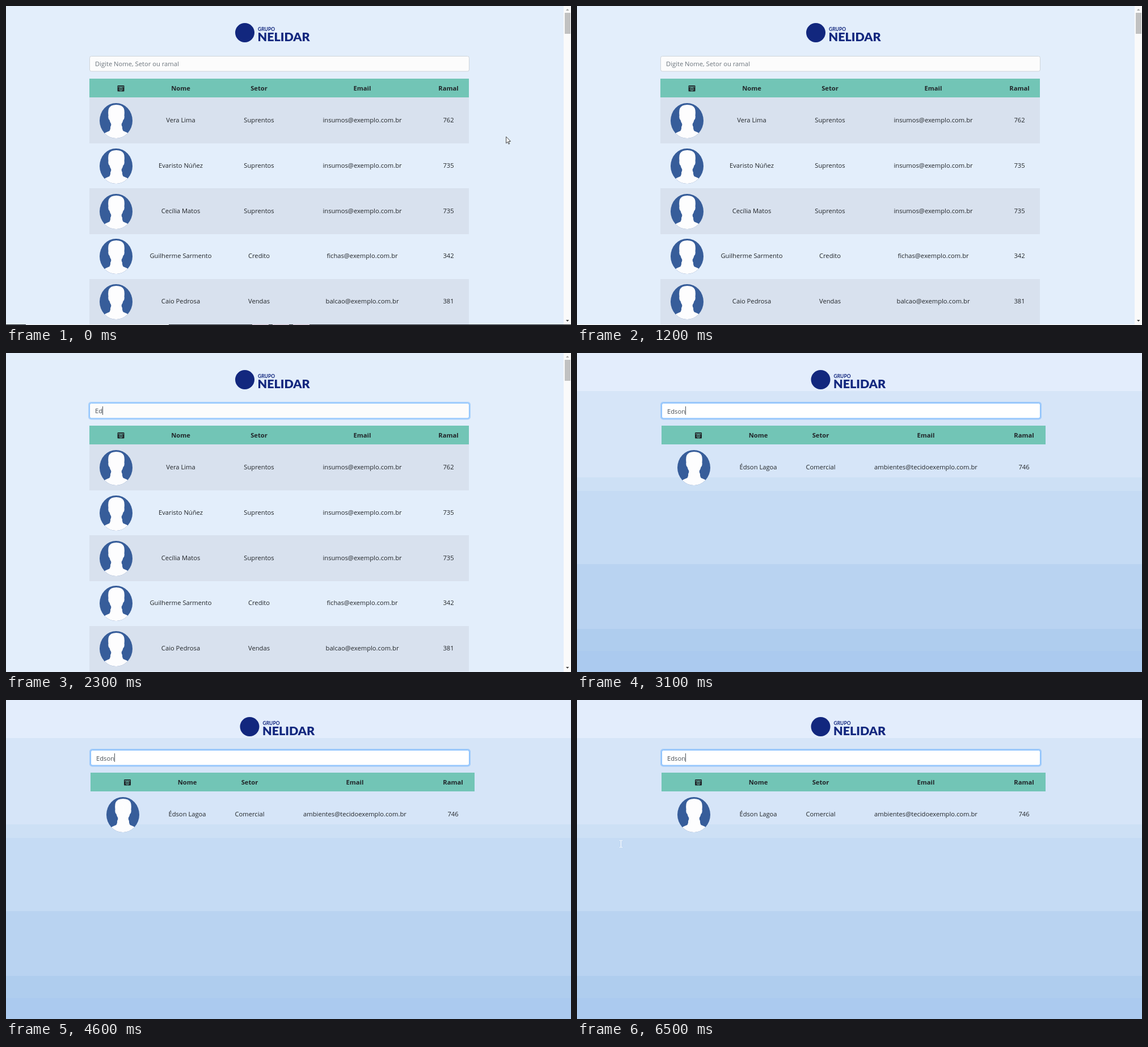
An HTML page with a canvas for the animation above (7000 ms loop, 996 px wide and 562 px high).

```html
<!DOCTYPE html>
<html lang="pt-BR">
<head>
<meta charset="utf-8">
<title>Ramais</title>
<style>
html, body { margin: 0; width: 100%; height: 100%; overflow: hidden; }
canvas { display: block; }
</style>
</head>
<body>
<canvas id="stage" width="996" height="562"></canvas>
<script>
const ctx = document.getElementById('stage').getContext('2d');
const LOOP = 7000;
const FACE = '"Open Sans", "Noto Sans", sans-serif';
const BODY = '11.2px ' + FACE;
const BOLD = 'bold 11.2px ' + FACE;
const INK = '#212529', NAVY = '#12277e', PAGE = '#e3eefb', GREEN = '#72c5b6';

const people = [
  ['Vera Lima', 'Suprentos', 'insumos@exemplo.com.br', '762'],
  ['Evaristo Núñez', 'Suprentos', 'insumos@exemplo.com.br', '735'],
  ['Cecília Matos', 'Suprentos', 'insumos@exemplo.com.br', '735'],
  ['Guilherme Sarmento', 'Credito', 'fichas@exemplo.com.br', '342'],
  ['Caio Pedrosa', 'Vendas', 'balcao@exemplo.com.br', '381']
];
const match = ['Édson Lagoa', 'Comercial', 'ambientes@tecidoexemplo.com.br', '746'];
const rowTops = [161, 242, 321, 402, 481, 561];
const bands = [[0, '#e3edfc'], [67, '#d6e5f8'], [219, '#cde0f5'], [243, '#c5dbf4'],
               [372, '#b9d3f1'], [486, '#afcdee'], [525, '#abcaef']];

const full = { logo: 421, left: 147, fieldRight: 817, right: 816, icon: 202.5, photo: 194,
               cols: [308, 446, 628, 780] };
const found = { logo: 429.5, left: 149, fieldRight: 817, right: 826, icon: 214, photo: 206,
                cols: [319.5, 429.5, 615, 788] };

// Pointer paths as [time, x, y]
const arrowPath = [[0, 882, 230], [200, 882, 230], [400, 620, 180], [500, 370, 130], [600, 180, 102]];
const beamPath = [[4300, 412, 128], [4400, 320, 166], [4500, 237, 193], [4600, 207, 192],
                  [5300, 207, 192], [5600, 207, 208], [5700, 207, 208], [5800, 213, 228],
                  [6200, 212, 219], [6300, 212, 219], [6500, 77, 253], [7000, 77, 253]];

function rect(x, y, w, h, color) {
  ctx.fillStyle = color;
  ctx.fillRect(x, y, w, h);
}

function text(str, x, y, font, color, align) {
  ctx.font = font;
  ctx.fillStyle = color;
  ctx.textAlign = align || 'left';
  ctx.fillText(str, x, y);
}

function shape(points, color) {
  ctx.beginPath();
  points.forEach(([x, y]) => ctx.lineTo(x, y));
  ctx.closePath();
  ctx.fillStyle = color;
  ctx.fill();
}

function disc(x, y, r, color) {
  ctx.beginPath();
  ctx.arc(x, y, r, 0, 7);
  ctx.fillStyle = color;
  ctx.fill();
}

function rounded(x, y, w, h, r, color) {
  ctx.beginPath();
  ctx.roundRect(x, y, w, h, r);
  ctx.fillStyle = color;
  ctx.fill();
}

function along(path, t) {
  const i = path.findIndex(p => p[0] > t);
  if (i < 1) return path[i < 0 ? path.length - 1 : 0].slice(1);
  const [a, b] = [path[i - 1], path[i]];
  const k = (t - a[0]) / (b[0] - a[0]);
  return [a[1] + (b[1] - a[1]) * k, a[2] + (b[2] - a[2]) * k].map(Math.round);
}

function logo(x) {
  disc(x, 47, 17, NAVY);
  text('GRUPO', x + 23, 44, 'bold 8.5px Lato, sans-serif', NAVY);
  text('NELIDAR', x + 22.5, 61.5, '900 21.5px Lato, sans-serif', NAVY);
}

function field(view, focus, fill) {
  const w = view.fieldRight - view.left;
  if (focus) rounded(view.left - 2, 86, w + 4, 31.5, 5, `rgba(0,123,255,${0.25 * focus})`);
  rounded(view.left + 0.5, 88.5, w - 1, 26.5, 3, fill);
  ctx.strokeStyle = focus ? '#80bdff' : '#ced4da';
  ctx.lineWidth = 1;
  ctx.stroke();
}

function typed(str, x, y, caret) {
  text(str, x, y, BODY, '#495057');
  if (caret) rect(Math.floor(x + ctx.measureText(str).width), 94, 1, 15, '#495057');
}

function camera(x) {
  rounded(x - 6, 140, 12, 10.5, 1, INK);
  rect(x - 5, 142, 10, 1, GREEN);
  disc(x, 146.3, 3.1, GREEN);
  disc(x, 146.3, 2.3, INK);
  disc(x, 146.3, 1, GREEN);
}

function header(view) {
  rect(view.left, 128, view.right - view.left, 33, GREEN);
  camera(view.icon);
  ['Nome', 'Setor', 'Email', 'Ramal'].forEach((s, i) =>
    text(s, view.cols[i], 149, BOLD, INK, 'center'));
}

// Half of the bust; side is -1 or 1
function bustSide(side) {
  const curve = (a, b, c, d) => ctx.quadraticCurveTo(a * side, b, c * side, d);
  ctx.beginPath();
  ctx.moveTo(0, -28);
  curve(10, -28, 13, -22);
  curve(15, -18, 14, -9);
  curve(15, -4, 12, -1);
  curve(11, 3, 9.5, 5);
  curve(8.5, 8, 10.5, 11);
  curve(10, 15, 12, 18);
  curve(18, 20, 23, 24);
  ctx.lineTo(24 * side, 32);
  ctx.lineTo(-side, 32);
  ctx.lineTo(-side, -28);
  ctx.fill();
}

function avatar(x, y) {
  ctx.save();
  ctx.translate(x, y);
  ctx.beginPath();
  ctx.ellipse(0, 0, 29, 31, 0, 0, 7);
  ctx.fillStyle = '#375d9a';
  ctx.fill();
  ctx.clip();
  ctx.translate(0.5, 0);
  ctx.fillStyle = '#fdfdfe';
  bustSide(-1);
  bustSide(1);
  ctx.restore();
}

function row(view, person, mid) {
  avatar(view.photo, mid + 1);
  person.forEach((s, i) => text(s, view.cols[i], mid + 4, BODY, INK, 'center'));
}

function scrollbar() {
  rect(983, 0, 13, 562, '#fafafa');
  rect(985, 12, 10, 37, '#c1c1c1');
  shape([[987, 8], [992.5, 8], [989.8, 5]], '#a3a3a3');
  shape([[987, 553], [992.5, 553], [989.8, 556]], '#404040');
}

function taskbar() {
  rect(0, 561, 35, 1, '#26282c');
  rect(35, 561, 252, 1, '#f3f3f3');
  rect(287, 561, 709, 1, '#26282c');
  [434, 470, 506].forEach(x => rect(x, 561, 29, 1, '#d9c3d0'));
}

function arrow(x, y) {
  const tip = [[0, 0], [0, 11.5], [2.6, 9], [4.4, 13], [6, 12.3], [4.3, 8.3], [7.8, 8.1]]
    .map(([a, b]) => [x + a - 0.3, y + b + 0.3]);
  shape(tip, '#fff');
  ctx.strokeStyle = '#111';
  ctx.lineWidth = 0.8;
  ctx.stroke();
}

function beam(x, y) {
  rect(x, y - 5, 1, 11, '#fff');
  [-6, 6].forEach(d => {
    rect(x - 2, y + d, 2, 1, '#fff');
    rect(x + 1, y + d, 2, 1, '#fff');
  });
}

function drawList(t) {
  rect(0, 0, 996, 562, PAGE);
  logo(full.logo);
  field(full, Math.min(1, Math.max(0, (t - 1200) / 200)), '#fcfcfc');
  if (t < 2300) {
    text('Digite Nome, Setor ou ramal', 157, 106, BODY, '#6c757d');
    if (t >= 1800) rect(157, 94, 1, 15, '#495057');
  } else {
    typed('Ed', 157, 106, true);
  }
  header(full);
  people.forEach((p, i) => {
    const top = rowTops[i], h = rowTops[i + 1] - top;
    if (i % 2 === 0) rect(147, top, 669, h, '#d8e1ee');
    row(full, p, 201 + Math.round(i * 79.75));
  });
  scrollbar();
  if (t < 1200) taskbar();
  else if (t < 1300) rect(0, 561, 996, 1, '#fafafa');
  if (t < 600) arrow(...along(arrowPath, t));
}

function drawMatch(t) {
  bands.forEach(([y, color]) => rect(0, y, 996, 562 - y, color));
  logo(found.logo);
  field(found, 1, '#fff');
  typed('Edson', 159, 107, t < 3800 || t >= 4100);
  header(found);
  row(found, match, 201);
  if (t >= 4300) beam(...along(beamPath, t));
}

function frame(now) {
  const t = Math.floor(now % LOOP / 100) * 100;
  (t < 3100 ? drawList : drawMatch)(t);
  requestAnimationFrame(frame);
}
requestAnimationFrame(frame);
</script>
</body>
</html>
```
